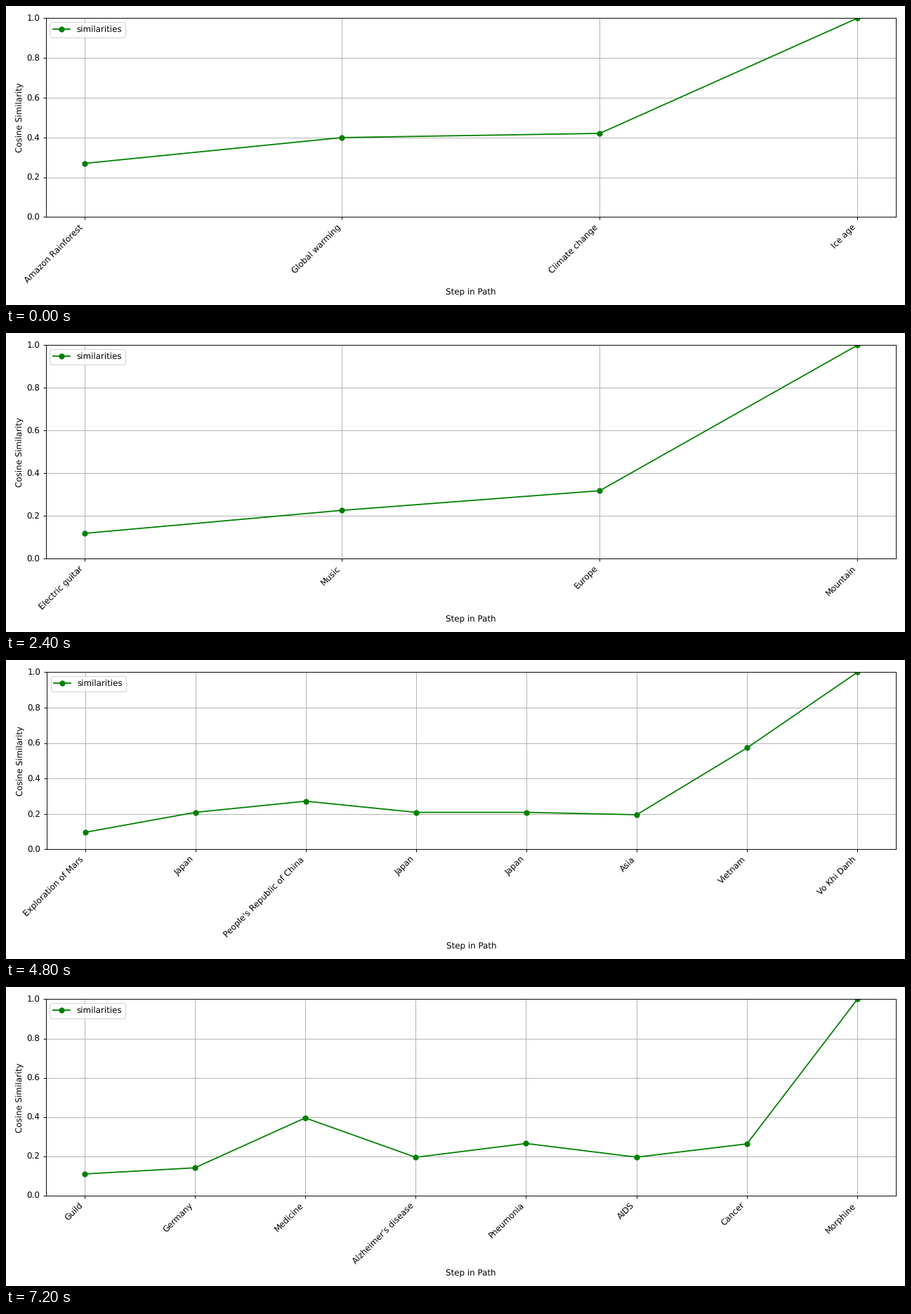
Animation of 1280x427 px, one loop 8000 ms. Source, as a matplotlib script:

```python
import numpy as np
import matplotlib.pyplot as plt
from matplotlib.animation import FuncAnimation

plt.rcParams["font.family"] = "DejaVu Sans"
plt.rcParams["text.hinting"] = "none"

DPI = 256 / 3
LAYOUT_DPI = 100
EPS = 1e-3  # keeps the pixel size from rounding down
HOLD_MS = 800

# Each path: its steps and their similarity to the last step.
PATHS = [
    (["Amazon Rainforest", "Global warming", "Climate change", "Ice age"],
     [0.270, 0.400, 0.421, 1]),
    (["Ancient mythology", "Planet", "Sunlight", "Colour"],
     [0.152, 0.271, 0.364, 1]),
    (["Tooth enamel", "Tobacco", "United States", "Jamaica"],
     [0.0955, 0.2876, 0.3137, 1]),
    (["Electric guitar", "Music", "Europe", "Mountain"],
     [0.118, 0.226, 0.318, 1]),
    (["The Lindlemates", "United States", "North America", "South America",
      "Chile"],
     [0.165, 0.295, 0.282, 0.4727, 1]),
    (["Sutton Hoo", "North Sea", "Europe", "Forest", "Biosphere", "Life"],
     [0.0724, 0.1643, 0.303, 0.332, 0.365, 1]),
    (["Exploration of Mars", "Japan", "People's Republic of China", "Japan",
      "Japan", "Asia", "Vietnam", "Vo Khi Danh"],
     [0.0962, 0.209, 0.272, 0.209, 0.209, 0.1956, 0.573, 1]),
    (["British English", "Australia", "Tropics", "Summer"],
     [0.212, 0.3054, 0.3127, 1]),
    (["Renewable energy", "Electricity", "Heat", "Water", "Ocean"],
     [0.131, 0.214, 0.283, 0.402, 1]),
    (["Guild", "Germany", "Medicine", "Alzheimer's disease", "Pneumonia",
      "AIDS", "Cancer", "Morphine"],
     [0.1096, 0.141, 0.3954, 0.1946, 0.265, 0.1953, 0.263, 1]),
]

fig = plt.figure(figsize=((1280 + EPS) / DPI, (427 + EPS) / DPI), dpi=DPI,
                 facecolor="white")


def fit_layout():
    """Measure the margins at the layout resolution with hinted text."""
    fig.dpi = LAYOUT_DPI
    with plt.rc_context({"text.hinting": "force_autohint"}):
        fig.tight_layout()
    fig.dpi = DPI


def draw_path(i):
    steps, similarities = PATHS[i]
    fig.clear()
    # Start from the default margins so the layout never depends on history.
    fig.subplots_adjust(left=0.125, right=0.9, bottom=0.11, top=0.88)
    ax = fig.add_subplot()
    ax.plot(similarities, marker="o", color="green", label="similarities")
    ax.set_xticks(range(len(steps)), steps, rotation=45, ha="right")
    ax.set_yticks(np.linspace(0, 1, 6))
    ax.set_ylim(0, 1)
    ax.set_xlabel("Step in Path")
    ax.set_ylabel("Cosine Similarity")
    ax.legend(loc="upper left")
    ax.grid(True)
    fit_layout()
    return ax.lines


anim = FuncAnimation(fig, draw_path, frames=len(PATHS), interval=HOLD_MS,
                     repeat=True)
plt.show()
```
